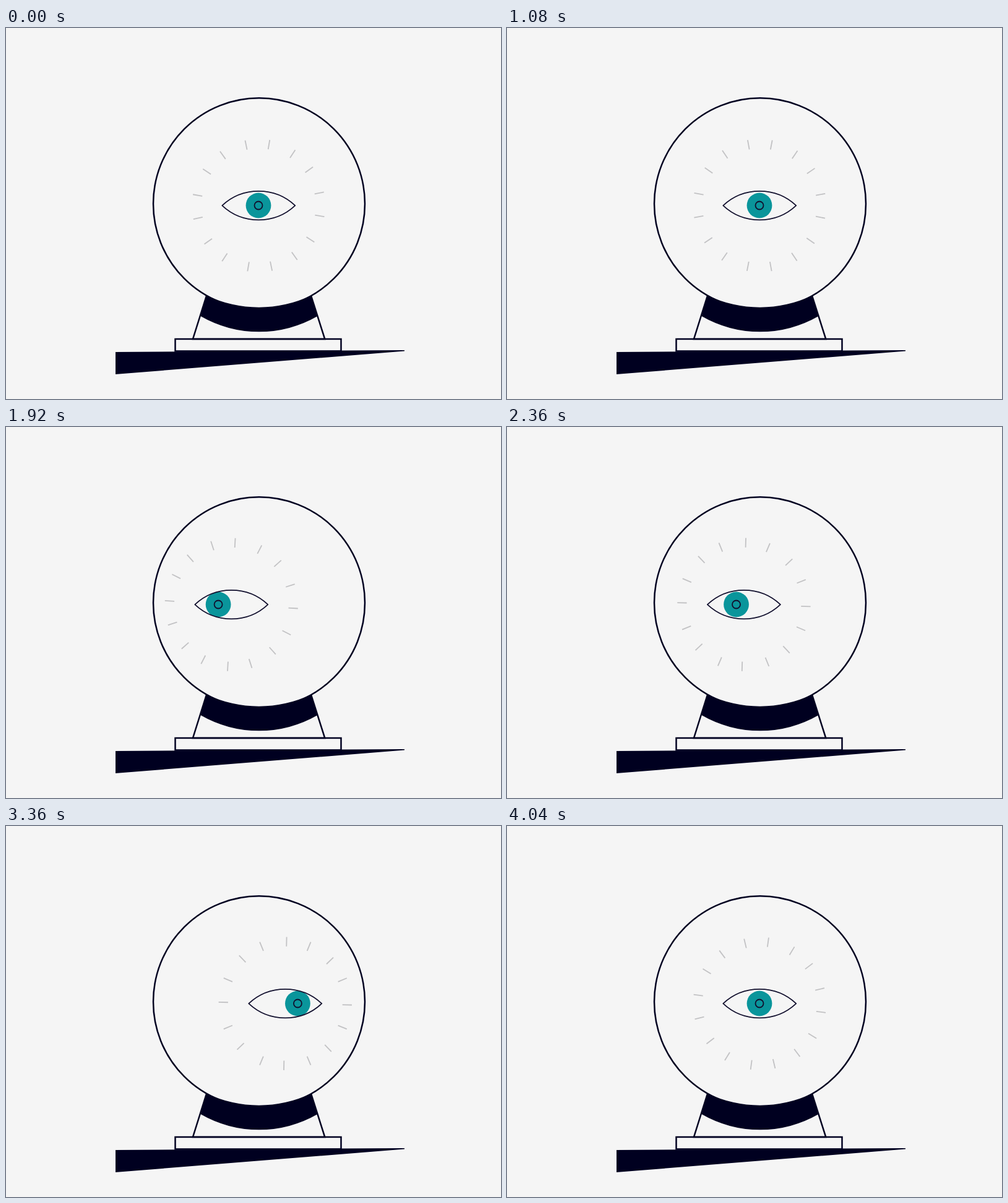
An HTML page for the animation above (4080 ms loop, 800 by 600 pixels).

```html
<!DOCTYPE html>
<html lang="en">
<head>
<meta charset="utf-8">
<title>Crystal ball</title>
<style>
  html, body { margin: 0; width: 100%; height: 100%; overflow: hidden; background: #f5f5f5; }
  svg { display: block; width: 800px; height: 600px; }
  .line { fill: none; stroke: #000020; stroke-width: 2.5; }
  .lid { fill: none; stroke: #110f2d; stroke-width: 1.8; stroke-linejoin: round; stroke-linecap: round; }
  .dark { fill: #000020; }
  #rays { stroke: #c2c2c4; stroke-width: 1.8; }
</style>
</head>
<body>
<svg viewBox="0 0 800 600">
  <defs><clipPath id="opening"><path id="mask"/></clipPath></defs>
  <circle class="line" cx="409" cy="284.3" r="171"/>
  <path class="line" d="M324 433L302 503H515.3L493 433"/>
  <path class="dark" d="M324 432.5A197 197 0 0 0 493.5 432.5L503.5 466A189 189 0 0 1 314.5 466Z"/>
  <rect class="line" x="273.5" y="503" width="268" height="19.5"/>
  <path class="dark" d="M177 524L644 521V522.5L177 560Z"/>
  <g id="rays"></g>
  <g id="eye">
    <g clip-path="url(#opening)">
      <g id="iris">
        <circle r="20.4" fill="#0a959b"/>
        <circle class="lid" r="6.5"/>
      </g>
    </g>
    <path id="outline" class="lid"/>
    <path id="crease" class="lid" pathLength="100" d="M61 -13.5C28 -45 -28 -45 -61 -13.5"/>
  </g>
</svg>
<script>
const LOOP = 4080, STEP = 40, STEPS = 101;
const CX = 408.3, CY = 287.2;
const [rays, eye, iris, mask, outline, crease] =
  ['rays', 'eye', 'iris', 'mask', 'outline', 'crease'].map(id => document.getElementById(id));

// Rays come in pairs, slightly uneven around the ring
for (let i = 0; i < 16; i++) {
  const ray = document.createElementNS('http://www.w3.org/2000/svg', 'path');
  ray.setAttribute('d', 'M0 -92.4V-107.7');
  ray.setAttribute('transform', `rotate(${(i >> 1) * 45 + (i & 1) * 23.7})`);
  rays.append(ray);
}

// Eased 0..1 ramp
function ramp(n, start, length) {
  const u = Math.min(1, Math.max(0, (n - start) / length));
  return u * u * (3 - 2 * u);
}

function draw(time) {
  // The first pose is held for two steps
  const n = Math.max(0, Math.floor(time % LOOP / STEP) - 1);

  const dx = -44 * (ramp(n, 37, 7.6) - ramp(n, 54.1, 8.7))
    + 43 * (ramp(n, 72.9, 8.7) - ramp(n, 90, 8.7));
  const place = `translate(${CX + dx} ${CY})`;
  eye.setAttribute('transform', place);
  rays.setAttribute('transform', `${place} rotate(${9.6 + 180 * n / STEPS})`);
  iris.setAttribute('transform', `translate(${dx * 0.475 - 0.3} -0.2)`);

  const lidY = -31 + 62 * (ramp(n, 13.9, 5) - ramp(n, 20, 5));
  const shape = `M-59 0C-26 ${lidY} 26 ${lidY} 59 0C26 31 -26 31 -59 0Z`;
  mask.setAttribute('d', shape);
  outline.setAttribute('d', shape);

  const drawn = 100 * (ramp(n, 14, 6.4) - ramp(n, 20.4, 5));
  crease.setAttribute('stroke-dasharray', `${drawn} 200`);
  crease.setAttribute('visibility', drawn > 0.1 ? 'visible' : 'hidden');
}

const begin = performance.now();
function tick() {
  draw(performance.now() - begin);
  requestAnimationFrame(tick);
}
tick();
</script>
</body>
</html>
```
